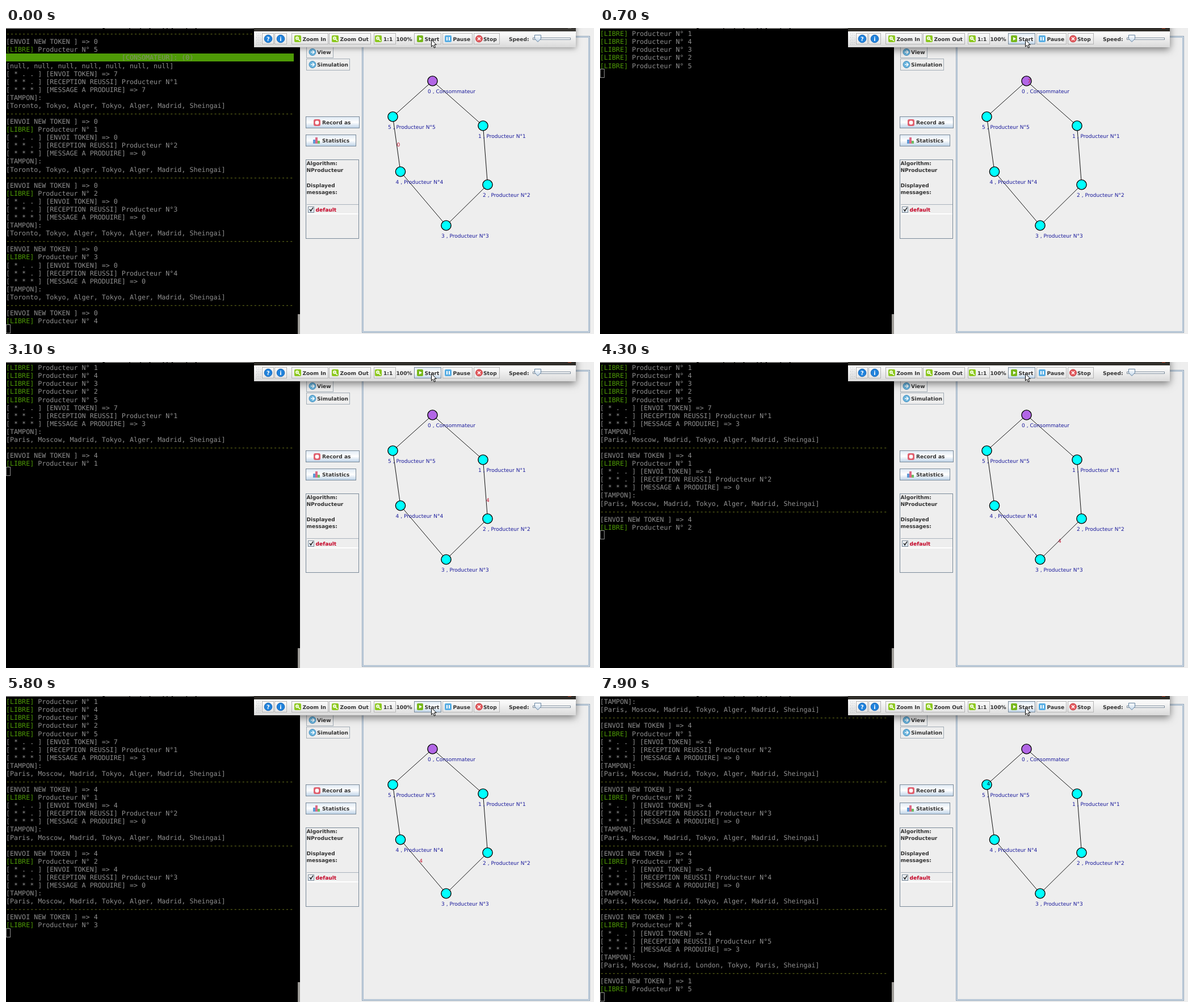
An HTML page with a canvas that plays this animation: 1036 by 540 pixels, repeating every 8 s.

```html
<!DOCTYPE html>
<html lang="fr">
<head>
<meta charset="utf-8">
<title>Token ring simulation</title>
<style>
html, body { margin: 0; width: 100%; height: 100%; overflow: hidden; background: #eee; }
canvas { display: block; }
</style>
</head>
<body>
<canvas id="stage" width="1036" height="540"></canvas>
<script>
const ctx = document.getElementById('stage').getContext('2d');
const LOOP = 8000, TICK = 100;
const HELD = [6500, 7000, 7500];
const MONO = '11.68px "DejaVu Sans Mono", monospace';
const BOLD = 'bold 9.1px "DejaVu Sans", sans-serif';
const PLAIN = '9.05px "DejaVu Sans", sans-serif';
const CELL = 7.03, ROW = 14.08, ROWS = 38;
const GRAY = '#8f8f8f', GREEN = '#4e9a06', OLIVE = '#76801f', STEEL = '#7a8a99';

// ---- drawing helpers ----
function box(x, y, w, h, fill, stroke) {
  if (fill) { ctx.fillStyle = fill; ctx.fillRect(x, y, w, h); }
  if (stroke) {
    ctx.strokeStyle = stroke; ctx.lineWidth = 1;
    ctx.strokeRect(x + .5, y + .5, w - 1, h - 1);
  }
}
function roundBox(x, y, w, h, r, fill) {
  ctx.beginPath(); ctx.roundRect(x, y, w, h, r);
  ctx.fillStyle = fill; ctx.fill();
}
function disc(x, y, r, fill, stroke, width = 1) {
  ctx.beginPath(); ctx.arc(x, y, r, 0, Math.PI * 2);
  ctx.fillStyle = fill; ctx.fill();
  if (stroke) { ctx.strokeStyle = stroke; ctx.lineWidth = width; ctx.stroke(); }
}
function line(points, color, width = 1) {
  ctx.beginPath();
  points.forEach(([x, y]) => ctx.lineTo(x, y));
  ctx.strokeStyle = color; ctx.lineWidth = width; ctx.stroke();
}
function shape(points, fill, stroke) {
  ctx.beginPath();
  points.forEach(([x, y]) => ctx.lineTo(x, y));
  ctx.closePath();
  ctx.fillStyle = fill; ctx.fill();
  if (stroke) { ctx.strokeStyle = stroke; ctx.lineWidth = 1; ctx.stroke(); }
}
function text(str, x, y, font, color) {
  ctx.font = font; ctx.fillStyle = color; ctx.fillText(str, x, y);
}
function fade(y0, y1, ...colors) {
  const g = ctx.createLinearGradient(0, y0, 0, y1);
  colors.forEach((c, i) => g.addColorStop(i / (colors.length - 1), c));
  return g;
}
const glossy = (y, h) => fade(y, y + h, '#dde8f3', '#ffffff', '#b8cfe5');

// ---- terminal ----
const RULE = '-'.repeat(72);
const libre = n => `[LIBRE] Producteur N° ${n}`;
const round = (n, token, msg, buffer, next) => [
  `[ * . . ] [ENVOI TOKEN] => ${token}`,
  `[ * * . ] [RECEPTION REUSSI] Producteur N°${n}`,
  `[ * * * ] [MESSAGE A PRODUIRE] => ${msg}`,
  '[TAMPON]:', `[${buffer}]`, RULE,
  `[ENVOI NEW TOKEN ] => ${next}`, libre(n)
];
const OLD = 'Toronto, Tokyo, Alger, Tokyo, Alger, Madrid, Sheingai';
const NEW = 'Paris, Moscow, Madrid, Tokyo, Alger, Madrid, Sheingai';
const LAST = 'Paris, Moscow, Madrid, London, Tokyo, Paris, Sheingai';
const before = [
  RULE, '[ENVOI NEW TOKEN ] => 0', libre(5),
  '#' + ' '.repeat(29) + '[CONSOMATEUR]: (0)',
  `[${Array(7).fill('null').join(', ')}]`,
  ...round(1, 7, 7, OLD, 0),
  ...[2, 3, 4].flatMap(n => round(n, 0, 0, OLD, 0))
];
const rounds = [
  round(1, 7, 3, NEW, 4),
  ...[2, 3, 4].map(n => round(n, 4, 0, NEW, 4)),
  round(5, 4, 3, LAST, 1)
];
function terminalLines(done) {
  if (done < 0) return before;
  return [...[1, 4, 3, 2, 5].map(libre), ...rounds.slice(0, done).flat()];
}
function cells(str, y, color) {
  [...str].forEach((ch, i) => {
    if (ch === ' ') return;
    ctx.fillStyle = color(i);
    ctx.fillText(ch, i * CELL, y);
  });
}
function drawTerminal(done) {
  box(0, 0, 518, 540, '#000');
  box(0, 0, 518, 1, '#c9c7c3');
  ctx.save();
  ctx.beginPath(); ctx.rect(0, 0, 437, 1); ctx.clip();
  text('algorithmique/projet/app/java/projet', 160, -1, BOLD, '#222');
  ctx.restore();
  const lines = terminalLines(done).slice(-(ROWS - 1));
  ctx.font = MONO;
  lines.forEach((str, i) => {
    const y = 14.2 + i * ROW;
    if (str[0] === '#') {
      box(0, Math.round(y - 11.4), 507, 14, GREEN);
      cells(str.slice(1), y, () => '#84906f');
    } else {
      const base = str === RULE ? OLIVE : GRAY;
      const greenEnd = str.startsWith('[LIBRE]') ? 7 : 0;
      cells(str, y, k => k < greenEnd ? GREEN : base);
    }
  });
  box(0, Math.floor(2.2 + lines.length * ROW), 8, 16, null, GRAY);
  box(514, 505, 4, 35, '#9c9a96');
}

// ---- side panel ----
function sideButton(x, y, w, h, label, tx, tinted) {
  box(x, y, w, h, tinted ? glossy(y, h) : '#eeeeee', tinted ? STEEL : '#a3adb6');
  text(label, tx, y + h / 2 + 3.4, BOLD, '#333');
}
function arrowIcon(x, y) {
  disc(x, y, 6, '#68b3dc', '#4a8fbd');
  line([[x - 3, y], [x + 3, y]], '#fff', 1.5);
  line([[x, y - 3], [x + 3, y], [x, y + 3]], '#fff', 1.5);
}
function drawSide() {
  sideButton(529, 33, 48, 20, 'View', 548);
  arrowIcon(540, 42.5);
  sideButton(529, 54, 77, 21, 'Simulation', 548);
  arrowIcon(540, 64.5);
  sideButton(528, 156, 95, 21, 'Record as', 557, true);
  roundBox(542, 161, 12, 12, 3, '#e0606e');
  disc(548, 167, 3.4, '#fff');
  sideButton(528, 188, 89, 21, 'Statistics', 557, true);
  box(541, 197, 4, 7, '#5f9ad6');
  box(545, 193, 4, 11, '#dc6a86');
  box(549, 199, 4, 5, '#6cbc62');

  box(528, 232, 94, 140, null, STEEL);
  [['Algorithm:', 242], ['NProducteur', 254], ['Displayed', 281], ['messages:', 293]]
    .forEach(([s, y]) => text(s, 529.5, y, BOLD, '#333'));
  box(530, 311, 91, 1, '#a9b3bc');
  box(530, 327, 91, 2, '#fff');
  box(532, 315, 11, 11, fade(315, 326, '#fff', '#d5e2ef'), STEEL);
  line([[535, 319.5], [537, 323], [541, 317]], '#222', 1.5);
  text('default', 545.5, 323.6, BOLD, '#c40024');
}

// ---- graph ----
const nodes = [[751, 93], [840, 172], [848, 276], [775, 348], [694.5, 253], [681, 156]]
  .map(([x, y]) => [x + .5, y + .5]);
// from, to, token, start, duration
const hops = [
  [0, 1, 7, 670, 1370],
  [1, 2, 4, 2140, 1370],
  [2, 3, 4, 3520, 1370],
  [3, 4, 4, 4870, 1585],
  [4, 5, 4, 6540, 1220]
];
function drawGraph() {
  box(627, 14, 402, 524, null, '#8fa3b7');
  box(628, 15, 400, 522, null, '#dbe5ef');
  box(629, 16, 398, 520, null, '#9fb3c7');
  nodes.forEach((n, i) => line([n, nodes[(i + 1) % nodes.length]], '#111'));
  nodes.forEach(([x, y], i) => {
    disc(x, y, 8.6, i ? '#00ffff' : '#b266e6', '#000', 1.4);
    text(`${i} , ${i ? 'Producteur N°' + i : 'Consommateur'}`, x - 8.5, y + 21.2, PLAIN, '#1a1a9c');
  });
}
function drawToken(index, t) {
  const [from, to, token, start, span] = index < 0 ? [4, 5, 0, 0, 1] : hops[index];
  const p = index < 0 ? .474 : Math.min(1, (t - start) / span);
  const [ax, ay] = nodes[from], [bx, by] = nodes[to];
  ctx.save();
  ctx.globalCompositeOperation = 'darken';
  text(token, ax + (bx - ax) * p, ay + (by - ay) * p + 1.5, PLAIN, '#c4102c');
  ctx.restore();
}

// ---- toolbar ----
function toolButton(x, w, label, tx, pressed) {
  box(x, 9, w, 20, pressed ? glossy(9, 20) : fade(9, 29, '#fbfbfb', '#e4e4e4'), pressed ? STEEL : '#b4b4b4');
  if (label) text(label, tx, 22.5, BOLD, '#333');
}
function zoomIcon(x) {
  roundBox(x, 13, 12, 12, 2, '#8cc81e');
  disc(x + 5, 18, 2.4, '#c8ec80', '#fff', 1.2);
  line([[x + 7, 20], [x + 10, 23]], '#fff', 1.6);
}
function drawToolbar(focused, pressed) {
  ctx.save();
  ctx.shadowColor = focused ? 'rgba(0,0,0,.5)' : 'rgba(0,0,0,.38)';
  ctx.shadowBlur = focused ? 13 : 9;
  ctx.shadowOffsetY = focused ? 4 : 2;
  box(437, -10, 567, 44, '#eee');
  ctx.restore();
  box(437, 0, 567, 34, fade(6, 34, '#ffffff', '#dadada'));
  box(437, 0, 567, 6, focused ? '#302e2a' : '#3b3935');
  box(990, 0, 6, 1, focused ? '#b9452a' : '#77746c');

  for (let y = 10; y < 29; y += 3)
    for (let x = 441; x < 448; x += 3) box(x + (y % 2), y, 1, 1, '#a0a8b0');

  toolButton(451, 21);
  toolButton(473, 22);
  [['?', 462], ['i', 484]].forEach(([ch, x]) => {
    disc(x, 19, 6.8, '#2183dc', '#1765b5');
    ctx.textAlign = 'center';
    text(ch, x, 22.6, 'bold 10px "DejaVu Sans", sans-serif', '#fff');
    ctx.textAlign = 'left';
  });

  toolButton(503, 65, 'Zoom In', 522.5);
  zoomIcon(508);
  toolButton(569, 74, 'Zoom Out', 588.5);
  zoomIcon(574);
  toolButton(648, 39, '1:1', 665);
  zoomIcon(650);
  text('100%', 687.5, 22.5, BOLD, '#333');

  toolButton(719, 48, 'Start', 737.5, pressed);
  roundBox(724, 13, 11, 12, 2, '#78b81c');
  shape([[728, 16], [733, 19], [728, 22]], '#fff');

  toolButton(769, 53, 'Pause', 787.5);
  roundBox(773, 13, 12, 12, 2, '#58aee4');
  box(776, 16, 2, 6, '#fff');
  box(780, 16, 2, 6, '#fff');

  toolButton(824, 46, 'Stop', 841);
  disc(833.5, 19, 6, '#e2585c', '#c8484d');
  line([[831, 16.5], [836, 21.5]], '#fff', 1.7);
  line([[836, 16.5], [831, 21.5]], '#fff', 1.7);

  text('Speed:', 886, 22.5, BOLD, '#333');
  box(928, 17, 67, 4, '#fff', STEEL);
  shape([[931.5, 12.5], [942.5, 12.5], [942.5, 19], [937, 24.5], [931.5, 19]],
    fade(12, 24, '#ffffff', '#c5d8ea'), '#6382a0');
}
function drawPointer() {
  const outline = [[0, 0], [0, 12.5], [2.8, 10], [5, 14.6], [7, 13.6], [5, 9.2], [8.6, 9]];
  shape(outline.map(([x, y]) => [x + 749.5, y + 20.5]), '#fff', '#000');
}

function render(now) {
  let t = Math.floor((now % LOOP) / TICK) * TICK;
  if (HELD.includes(t)) t -= TICK;
  const hop = hops.filter(h => h[3] <= t).length - 1;
  const done = t >= 7900 ? 5 : hop;
  ctx.textRendering = 'geometricPrecision';
  box(0, 0, 1036, 540, '#eeeeee');
  drawTerminal(done);
  drawSide();
  drawGraph();
  drawToken(hop, t);
  drawToolbar(t >= 400, t >= 500);
  drawPointer();
}

const begin = performance.now();
function loop() {
  render(performance.now() - begin);
  requestAnimationFrame(loop);
}
loop();
</script>
</body>
</html>
```
